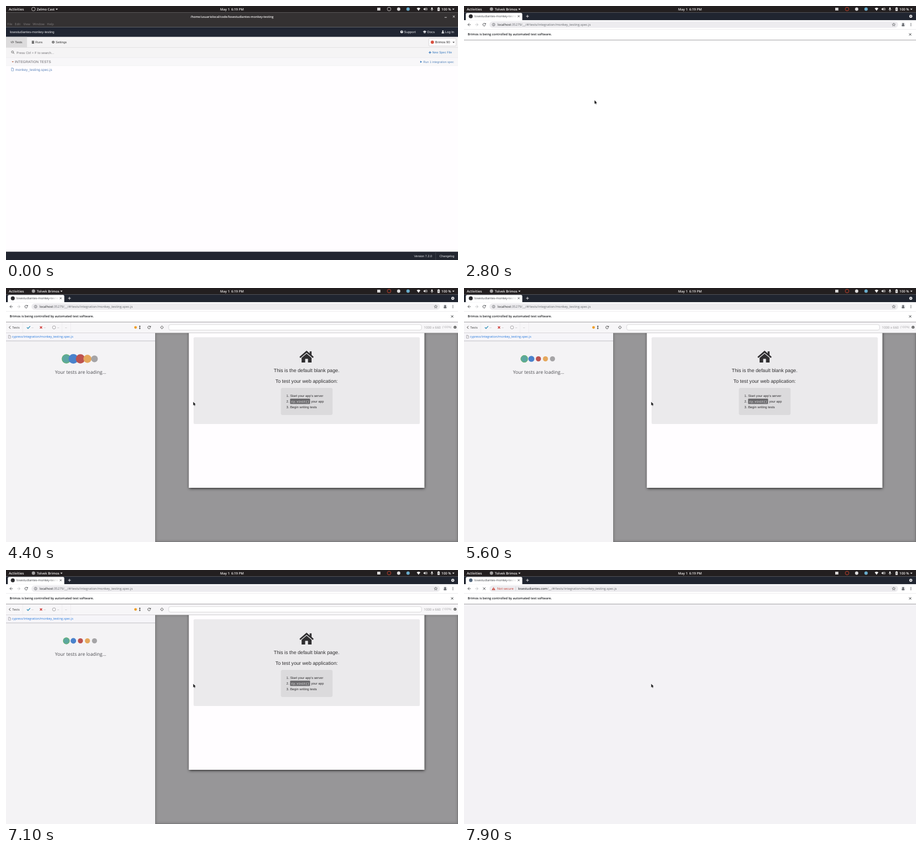
Write an HTML page with a canvas that moves like this. It is 800x450 px and loops after 8 s.

```html
<!DOCTYPE html>
<html lang="en">
<head>
<meta charset="utf-8">
<title>Test run</title>
<style>
html, body { margin: 0; width: 100%; height: 100%; overflow: hidden; background: #fff; }
canvas { display: block; width: 800px; height: 450px; }
</style>
</head>
<body>
<canvas id="stage" width="800" height="450"></canvas>
<script>
const ctx = document.getElementById('stage').getContext('2d');
const LOOP = 8000, S = 800 / 1920, TAU = Math.PI * 2;
const OPEN = '"Open Sans", "Noto Sans", sans-serif';
const ARIAL = '"Liberation Sans", Arial, sans-serif';
const MONO = '"Liberation Mono", monospace';

const clamp = v => Math.max(0, Math.min(1, v));
const ease = v => { v = clamp(v); return v * v * (3 - 2 * v); };
const mix = (a, b, k) => a + (b - a) * k;

function rect(x, y, w, h, c) { ctx.fillStyle = c; ctx.fillRect(x, y, w, h); }

function round(x, y, w, h, r, fill, stroke, lw = 0.6) {
  ctx.beginPath();
  ctx.roundRect(x, y, w, h, r);
  if (fill) { ctx.fillStyle = fill; ctx.fill(); }
  if (stroke) { ctx.strokeStyle = stroke; ctx.lineWidth = lw; ctx.stroke(); }
}

function disc(x, y, r, c) {
  ctx.beginPath(); ctx.arc(x, y, r, 0, TAU);
  ctx.fillStyle = c; ctx.fill();
}

function arc(x, y, r, c, lw = 0.8, a = 0, b = TAU) {
  ctx.beginPath(); ctx.arc(x, y, r, a, b);
  ctx.strokeStyle = c; ctx.lineWidth = lw; ctx.stroke();
}

function path(pts, x, y) {
  ctx.beginPath();
  for (let i = 0; i < pts.length; i += 2) ctx.lineTo(x + pts[i], y + pts[i + 1]);
}

function poly(pts, x, y, c) { path(pts, x, y); ctx.closePath(); ctx.fillStyle = c; ctx.fill(); }

function line(pts, x, y, c, lw = 0.8) { path(pts, x, y); ctx.strokeStyle = c; ctx.lineWidth = lw; ctx.stroke(); }

// cy is the middle of the capitals, px the size on a 1920 wide screen
function text(s, x, cy, px, color, { font = ARIAL, weight = 400, align = 'left' } = {}) {
  ctx.save();
  ctx.translate(x, cy + 0.36 * px * S);
  ctx.scale(S, S);
  ctx.font = `${weight} ${px}px ${font}`;
  ctx.textRendering = 'geometricPrecision';
  ctx.textAlign = align;
  ctx.fillStyle = color;
  ctx.fillText(s, 0, 0);
  const w = ctx.measureText(s).width * S;
  ctx.restore();
  return w;
}

function cross(x, y, r, c, lw = 0.9) {
  line([-r, -r, r, r], x, y, c, lw);
  line([-r, r, r, -r], x, y, c, lw);
}

function plus(x, y, r, c, lw = 0.9) {
  line([-r, 0, r, 0], x, y, c, lw);
  line([0, -r, 0, r], x, y, c, lw);
}

const down = (x, y, c, r = 2) => poly([-r, -r / 2, r, -r / 2, 0, r * 0.6], x, y, c);

function reload(x, y, c) {
  arc(x, y, 2.4, c, 0.9, 0.4, TAU - 0.7);
  poly([0.3, -0.4, 3, -0.4, 3, -3], x, y, c);
}

function info(x, y, c) {
  disc(x, y, 2.5, c);
  rect(x - 0.4, y - 0.4, 0.8, 1.9, '#fff');
  rect(x - 0.4, y - 1.6, 0.8, 0.8, '#fff');
}

function fileIcon(x, y, c) {
  line([-1.8, -2.6, 0.7, -2.6, 1.9, -1.3, 1.9, 2.6, -1.8, 2.6, -1.8, -2.8], x, y, c, 0.6);
  line([0.5, -2.6, 0.5, -1.1, 1.9, -1.1], x, y, c, 0.5);
}

function topBar(t) {
  const o = { font: OPEN, weight: 600 }, c = '#f2f0ef';
  rect(0, 0, 800, 11.3, '#231f20');
  text('Activities', 5, 5.5, 14.6, c, o);
  let name = 'Zelmo Cast';
  if (t < 2100) arc(48.6, 5.4, 3.2, '#d8d5d4');
  else if (t < 2500) { name = 'Cypress'; disc(48.6, 5.4, 2.9, '#a9a7a8'); }
  else { name = 'Tolvek Brimos'; disc(48.6, 5.4, 3, '#a3a1a2'); }
  down(58.2 + text(name, 54.5, 5.5, 14.2, c, o), 5.7, c);
  text('May 1  6:19 PM', 400, 5.5, 14, c, { ...o, align: 'center' });
  rect(657, 3, 5.6, 5, '#d8d6d6');
  arc(678, 5.4, 3.2, t < 2100 ? '#c9c6c6' : '#d2452f', 0.9);
  disc(695, 5.5, 2.9, '#dedcdd');
  disc(711.6, 5.5, 3, '#6aaccb');
  ctx.beginPath();
  ctx.moveTo(730.2, 8.4);
  ctx.arc(730.2, 8.4, 5.2, -2.25, -0.9);
  ctx.fillStyle = c; ctx.fill();
  poly([-3, -1, -1.6, -1, 0.3, -2.8, 0.3, 2.8, -1.6, 1, -3, 1], 742, 5.5, c);
  arc(742, 5.5, 1.9, c, 0.7, -0.9, 0.9);
  arc(742, 5.5, 3.4, c, 0.7, -0.9, 0.9);
  round(752.8, 2.4, 2.2, 4, 1.1, c);
  arc(753.9, 5.2, 2.1, c, 0.6, 0, Math.PI);
  rect(753.6, 7.2, 0.7, 1.5, c);
  round(763.7, 2.9, 3.9, 5.8, 0.5, c);
  rect(764.8, 2.2, 1.7, 0.8, c);
  rect(765.2, 4.3, 0.9, 2.6, '#555');
  text('100 %', 770.8, 5.5, 14.3, c, o);
  down(791.8, 5.7, c);
}

function appWindow(t, hover) {
  const light = '#e8e9ec', dark = '#444', link = '#3c7cc0';
  rect(0, 11.3, 800, 26.2, '#343132');
  text('/home/usuariolocal/code/losestudiantes-monkey-testing', 400, 18.8, 12.9, '#f4f2f2',
    { font: OPEN, weight: 600, align: 'center' });
  rect(776.2, 19.7, 4, 0.9, '#ddd');
  cross(792.6, 18.7, 1.7, '#eee');
  const menu = t < 2100 ? '#807d7e' : '#e2e0e0';
  [['File', 2.3], ['Edit', 15.6], ['View', 30.8], ['Window', 47.2], ['Help', 72.6]]
    .forEach(([s, x]) => text(s, x, 31.8, 13.3, menu, { font: OPEN }));

  rect(0, 37.5, 800, 17.3, '#202532');
  text('losestudiantes-monkey-testing', 6.8, 45.8, 14, light);
  disc(700.4, 45.8, 2.5, light);
  text('?', 700.4, 45.8, 10, '#202532', { weight: 700, align: 'center' });
  text('Support', 704.6, 45.8, 14, light);
  poly([-3.4, -0.6, 0, -2.2, 3.4, -0.6, 0, 1], 741, 45.8, light);
  poly([-1.9, 0.5, 0, 1.4, 1.9, 0.5, 1.9, 1.7, 0, 2.5, -1.9, 1.7], 741, 45.8, light);
  text('Docs', 745.6, 45.8, 14, light);
  disc(773.2, 44.6, 1.3, light);
  round(771, 46, 4.4, 2.4, [1.6, 1.6, 0, 0], light);
  text('Log In', 776.9, 45.8, 14, light);

  rect(0, 54.8, 800, 19, '#f4f3f4');
  rect(0, 54.8, 37.2, 18.7, '#dcdbdc');
  line([-1.3, -1.4, -2.7, 0, -1.3, 1.4], 11.3, 64, dark);
  line([1.3, -1.4, 2.7, 0, 1.3, 1.4], 11.3, 64, dark);
  line([-0.5, 1.9, 0.5, -1.9], 11.3, 64, dark, 0.7);
  text('Tests', 16.1, 64, 13, '#333');
  for (let i = 0; i < 3; i++) round(45.6, 61.7 + i * 1.7, 4.2, 1.4, 0.6, dark);
  text('Runs', 52, 64, 13, '#333');
  arc(83.5, 64, 1.5, dark, 1.2);
  for (let i = 0; i < 8; i++) {
    const a = i * TAU / 8;
    disc(83.5 + 2.1 * Math.cos(a), 64 + 2.1 * Math.sin(a), 0.45, dark);
  }
  text('Settings', 87.9, 64, 13, '#333');
  round(748.3, 57.3, 48.4, 13.6, 1.6, '#fdfcfd', '#c8c7c8');
  disc(754.6, 64.1, 2.9, '#d9503f');
  text('Brimos 90', 759.6, 64.1, 14, '#333');
  down(792.2, 64.5, '#333', 1.8);

  rect(0, 73.5, 800, 18, '#f5f4f5');
  rect(0, 73.3, 800, 0.6, '#d9d8d9');
  rect(0, 91, 800, 0.6, '#dedddf');
  arc(11.5, 81.4, 1.8, '#555', 0.8);
  line([1.3, 1.3, 3.1, 2.9], 11.5, 81.4, '#555', 0.9);
  text('Press Ctrl + F to search...', 18.6, 82.4, 14, '#77767a');
  plus(750.4, 82.4, 2.2, link, 1.2);
  text('New Spec File', 754.4, 82.4, 13, link);

  rect(0, 91.6, 800, 14.2, '#f8f7f9');
  down(12, 99, '#b5654a', 1.8);
  text('INTEGRATION TESTS', 15.6, 98.9, 15, '#66656a');
  poly([-1.4, -1.8, 1.8, 0, -1.4, 1.8], 734.6, 98.9, link);
  text('Run 1 integration spec', 738.4, 98.9, 13, '#5684bb');

  rect(0, 105.8, 800, 330, '#fffdff');
  rect(0, 105.6, 800, 0.5, '#ebeaec');
  if (hover) {
    rect(0, 106, 800, 13, '#f5f4f6');
    round(760.4, 110.8, 3.6, 3.6, 0.6, null, '#666', 0.7);
    line([-1.6, 1.7, 1.5, -1.4], 763, 111.8, '#666', 0.8);
    poly([-0.6, -2, 2, -2, 2, 0.6], 763, 111.6, '#666');
    text('Open in IDE', 766.2, 112.6, 13, '#66656a');
  }
  fileIcon(11.5, 112.4, '#5b86bd');
  text('monkey_testing.spec.js', 16.6, 112.6, 15, hover ? '#2f5688' : '#5b83ba');

  rect(0, 435.3, 800, 14.7, '#222630');
  text('Version 7.2.0', 722.3, 442.8, 13, light);
  rect(760.2, 435.3, 0.6, 14.7, '#4a4e58');
  text('Changelog', 767.2, 442.8, 13, light);
}

function browserChrome(t) {
  const moved = t >= 7700, dark = '#44474b', o = { font: OPEN, weight: 500 };
  rect(0, 11.3, 800, 14, '#202530');
  round(3.2, 12.2, 100, 13.4, [2.6, 2.6, 0, 0], '#fff');
  if (!moved) disc(12, 18.2, 3.5, '#2b2b2e');
  else if (t >= 7800) disc(12, 18.2, 3.1, '#52667c');
  ctx.save();
  ctx.beginPath(); ctx.rect(17, 12, 73.5, 13); ctx.clip();
  const title = moved && t < 7800 ? 'https://losestudiantes.com' : 'losestudiantes-monkey-testing';
  text(title, 18.2, 18.2, 13.1, '#3f4247', o);
  const fade = ctx.createLinearGradient(78, 0, 90.5, 0);
  fade.addColorStop(0, 'rgba(255,255,255,0)');
  fade.addColorStop(1, '#fff');
  rect(78, 13, 12.5, 11, fade);
  ctx.restore();
  cross(96.8, 18.2, 1.6, dark, 0.8);
  plus(112.3, 18.2, 2.5, '#e8e8ea', 0.9);
  disc(790.8, 18.2, 2.7, '#e4e4e6');
  down(790.8, 18.5, '#202530', 1.4);

  rect(0, 25.2, 800, 15.8, '#fff');
  line([2.7, 0, -2.5, 0], 9.2, 33, dark);
  line([0.2, -2.6, -2.4, 0, 0.2, 2.6], 9.2, 33, dark);
  line([-2.7, 0, 2.5, 0], 22.6, 33, '#b9babd');
  line([-0.2, -2.6, 2.4, 0, -0.2, 2.6], 22.6, 33, '#b9babd');
  if (moved) cross(35.8, 33, 2.2, dark); else reload(35.8, 33, dark);
  round(45, 27.2, 723.4, 11.6, 5.8, '#edecef');
  const tail = '/__/#/tests/integration/monkey_testing.spec.js';
  let x = 59.2, host = 'localhost', rest = ':35279' + tail;
  if (moved) {
    const k = ease((t - 7700) / 140);
    host = 'losestudiantes.com'; rest = tail;
    x = mix(82, 95.4, k);
    poly([0, -2.8, 3.1, 2.5, -3.1, 2.5], 52.3, 33, '#c5392f');
    rect(51.9, 31.6, 0.8, 2, '#fff');
    rect(51.9, 34.1, 0.8, 0.8, '#fff');
    ctx.save();
    ctx.beginPath(); ctx.rect(57, 27, x - 63.5, 12); ctx.clip();
    text('Not secure', 58.8, 33, 13.7, '#c5392f', o);
    ctx.restore();
    rect(x - 4.2, 29.4, 0.6, 7.2, '#c3c4c8');
  } else {
    arc(52.4, 33, 2.4, '#5c5f64', 0.7);
    rect(52, 32.6, 0.8, 1.9, '#5c5f64');
    rect(52, 31.4, 0.8, 0.8, '#5c5f64');
  }
  x += text(host, x, 33, 13.8, '#1e2023', o);
  text(rest, x, 33, 13.8, '#66696e', o);
  const star = [];
  for (let i = 0; i <= 10; i++) {
    const r = i % 2 ? 1.3 : 3, a = i * Math.PI / 5 - Math.PI / 2;
    star.push(r * Math.cos(a), r * Math.sin(a));
  }
  line(star, 760.6, 33.1, dark, 0.6);
  disc(777.2, 33, 3.7, '#dcdee2');
  disc(777.2, 31.9, 1.3, dark);
  round(774.9, 33.6, 4.6, 2, [1.5, 1.5, 0, 0], dark);
  for (let i = -1; i < 2; i++) disc(791, 33 + i * 2, 0.65, dark);
}

function infoBar(dy) {
  ctx.save();
  ctx.beginPath(); ctx.rect(0, 41, 800, 20 + dy); ctx.clip();
  ctx.translate(0, dy);
  rect(0, 41, 800, 19, '#fff');
  text('Brimos is being controlled by automated test software.', 6.6, 50.4, 13.5, '#1f2124', { font: OPEN, weight: 600 });
  cross(789.7, 50.4, 1.9, '#333639', 1);
  ctx.restore();
  rect(0, 40.8, 800, 0.6, '#d4d3d6');
  rect(0, 59.8 + dy, 800, 1, '#a3a2a5');
}

const BALLS = ['#5ca7a0', '#4a82cc', '#bd5350', '#e5a75c', '#a5a4a6'];

function loader(t) {
  const since = t < 3800 || t >= 7700 ? 1e5 : (t - 3800) % 1550;
  BALLS.forEach((c, i) => {
    const p = clamp((since - i * 100) / 1000);
    const r = 4.5 + 4 * Math.sin(Math.PI * p) ** 2;
    const x = 106.8 + i * 12.45;
    disc(x, 125.5, r, c);
    if (!i) arc(x, 125.5, r - 0.5, '#6cb668', 1);
  });
  text('Your tests are loading...', 132, 149, 20, '#4c4c51', { font: OPEN, align: 'center' });
}

function blankPage() {
  const c = '#2f2e30', mid = { align: 'center' };
  round(332, 87.3, 400.4, 153.8, 2, '#ebeaec');
  poly([-12.6, 0.4, 0, -10.6, 12.6, 0.4, 11, 2.4, 0, -7, -11, 2.4], 532, 121.7, c);
  poly([5.5, -9.4, 8.8, -9.4, 8.8, -1.2, 5.5, -4], 532, 121.7, c);
  poly([-8.8, 2, 0, -5.4, 8.8, 2, 8.8, 10.3, 2.5, 10.3, 2.5, 3.8, -2.5, 3.8, -2.5, 10.3, -8.8, 10.3], 532, 121.7, c);
  text('This is the default blank page.', 532, 146.3, 21, c, mid);
  text('To test your web application:', 532, 164.6, 21, c, mid);
  round(486.5, 177, 91.5, 48, 3.2, '#dbdadc');
  ["Start your app's server", '', 'Begin writing tests'].forEach((s, i) => {
    const y = 190.4 + i * 10.25;
    text(`${i + 1}.`, 496.3, y, 14, c);
    text(s, 502.9, y, 14, c);
  });
  round(502.8, 196.1, 35.4, 9.4, 1.2, '#6d6c6f');
  text('cy.visit()', 505, 200.7, 12.6, '#fff', { font: MONO });
  text('your app', 539.9, 200.6, 14, c);
}

function runnerHeader(t) {
  const full = t >= 3400, moved = t >= 7700, g = '#8a898c', o = { font: OPEN };
  rect(0, 60.8, 800, 18.7, '#f7f6f8');
  rect(0, 79.2, 800, 0.7, '#c0bfc2');
  const dash = x => text('--', x, 69.6, 13, g, { font: OPEN, align: 'center' });
  if (full) {
    line([1.2, -2.4, -1.2, 0, 1.2, 2.4], 6.7, 69.8, '#444', 1);
    text('Tests', 11, 69.8, 13.4, '#444', o);
    line([-2.8, 0, -0.8, 2, 3, -2.2], 39.8, 69.8, moved ? '#2f9a78' : '#3794bb', 1.4);
    cross(62, 69.8, 1.9, '#d0423f', 1.4);
    arc(85, 69.8, 2.8, '#98979a', 0.8);
    [47, 68.5, 92.5, 106.3].forEach(dash);
    [29.6, 98.8, 114.4].forEach(x => rect(x, 61, 0.5, 18, '#e6e5e8'));
    disc(229.3, 69.8, 2.4, moved ? '#e6b04e' : '#f0a02a');
    line([0, -2.6, 0, 2.6], 236.8, 69.8, '#333', 0.9);
    poly([-1.5, -1.5, 0, -3.2, 1.5, -1.5], 236.8, 69.8, '#333');
    poly([-1.5, 1.5, 0, 3.2, 1.5, 1.5], 236.8, 69.8, '#333');
    reload(253.3, 69.8, '#444');
    arc(276, 69.8, 2.1, '#666', 0.7);
    [0, 1, 2, 3].forEach(i => {
      const a = i * TAU / 4, c = Math.cos(a), s = Math.sin(a);
      line([c * 1.4, s * 1.4, c * 3.2, s * 3.2], 276, 69.8, '#666', 0.7);
    });
    info(794.8, 69.6, '#555');
  } else {
    [30.5, 49, 67.5, 78.5].forEach(dash);
    [16.4, 72, 85].forEach(x => rect(x, 61, 0.5, 18, '#e0dfe2'));
  }
  const bx = full ? 288 : 286;
  round(bx, 64.8, 735.4 - bx, 9.8, full ? 3 : 4.5, '#fff', '#c4c3c6');
  if (t >= 7300) {
    round(702, 64.8, 34.6, 9.8, 2, '#eeedef', '#c4c3c6');
    text('...loading', 704.6, 69.6, 11.8, '#77767a', o);
    arc(731, 69.7, 2.6, '#8b8a8d', 1, t / 150, t / 150 + 5);
  }
  text('1000 x 660', 739.8, 69.6, 14.1, '#98979a', o);
  text('(100%)', 772, 69.6, 12.6, '#a9a8ab', o);
}

// grey backdrop with a shadow running along the inside of its edges
function backdrop(x, y, w, h) {
  ctx.save();
  ctx.beginPath(); ctx.rect(x, y, w, h); ctx.clip();
  rect(x, y, w, h, '#979698');
  ctx.shadowColor = 'rgba(0,0,0,.6)';
  ctx.shadowBlur = 4;
  ctx.strokeStyle = '#6b6a6c';
  ctx.lineWidth = 1;
  ctx.strokeRect(x, y, w, h);
  ctx.restore();
}

function runner(t) {
  rect(0, 60, 264, 390, '#f4f3f5');
  backdrop(264, 79, 536, 371);
  if (t >= 3150) {
    ctx.save();
    ctx.shadowColor = 'rgba(0,0,0,.85)';
    ctx.shadowBlur = 5;
    ctx.shadowOffsetY = 1;
    rect(323.5, 76, 417.1, 278, '#fffdff');
    ctx.restore();
    if (t < 7300) blankPage();
  }
  runnerHeader(t);
  rect(0, 79.8, 264, 13.6, '#f6f5f9');
  rect(0, 93.2, 264, 0.8, '#c6c5ca');
  rect(0, 94, 264, 1, '#e6e5e9');
  if (t >= 3400) fileIcon(6.2, 86.4, '#8b8a8e');
  text('cypress/integration/monkey_testing.spec.js', 10.6, 86.4, 13, '#1f74dc', { font: OPEN, weight: 500 });
  loader(t);
}

function browser(t) {
  rect(0, 41, 800, 409, t < 3000 ? '#fff' : '#f3f2f5');
  const slide = t < 7700 ? 0 : -18.9 * (1 - ease((t - 7700) / 180));
  if (t >= 3000 && t < 7800) {
    ctx.save();
    ctx.translate(0, slide);
    runner(t);
    ctx.restore();
  }
  if (t >= 2750 && slide > -18.5) infoBar(slide);
  browserChrome(t);
}

function arrow(x, y) {
  const p = [0, 0, 0, 6.3, 1.5, 5, 2.5, 7.1, 3.4, 6.7, 2.5, 4.6, 4.4, 4.4];
  line([...p, 0, 0], x, y, '#f6f6f6', 0.6);
  poly(p, x, y, '#1b1b1c');
}

function hand(x, y) {
  const p = [-0.7, 0, 0.7, 0, 0.8, 2.4, 3.9, 3.2, 3.9, 5.4, 3, 8, -0.8, 8, -3, 4.8, -2.4, 4.1, -0.8, 5.2];
  poly(p, x, y, '#fff');
  line([...p, -0.7, 0], x, y, '#222', 0.7);
}

function pointer(t) {
  if (t < 2400) {
    const k = ease((t - 350) / 620);
    return { x: mix(230, 75, k), y: mix(310, 113.2, k) };
  }
  const k = ease((t - 2400) / 700);
  return { x: mix(75, 331.4, k), y: mix(113.2, 201.8, k) };
}

function draw(t) {
  const p = pointer(t);
  const hover = t >= 400 && p.y > 106 && p.y < 119;
  rect(0, 0, 800, 450, '#fff');
  if (t < 2750) appWindow(t, hover);
  if (t >= 2500) {
    const k = clamp((t - 2500) / 250), z = mix(0.85, 1, ease(k));
    ctx.save();
    ctx.globalAlpha = k;
    ctx.translate(400, 230);
    ctx.scale(z, z);
    ctx.translate(-400, -230);
    browser(t);
    ctx.restore();
  }
  topBar(t);
  if (t >= 400) (hover && p.x < 82 && t < 2500 ? hand : arrow)(p.x, p.y);
}

const start = performance.now();
function tick() {
  draw((performance.now() - start) % LOOP);
  requestAnimationFrame(tick);
}
tick();
</script>
</body>
</html>
```
